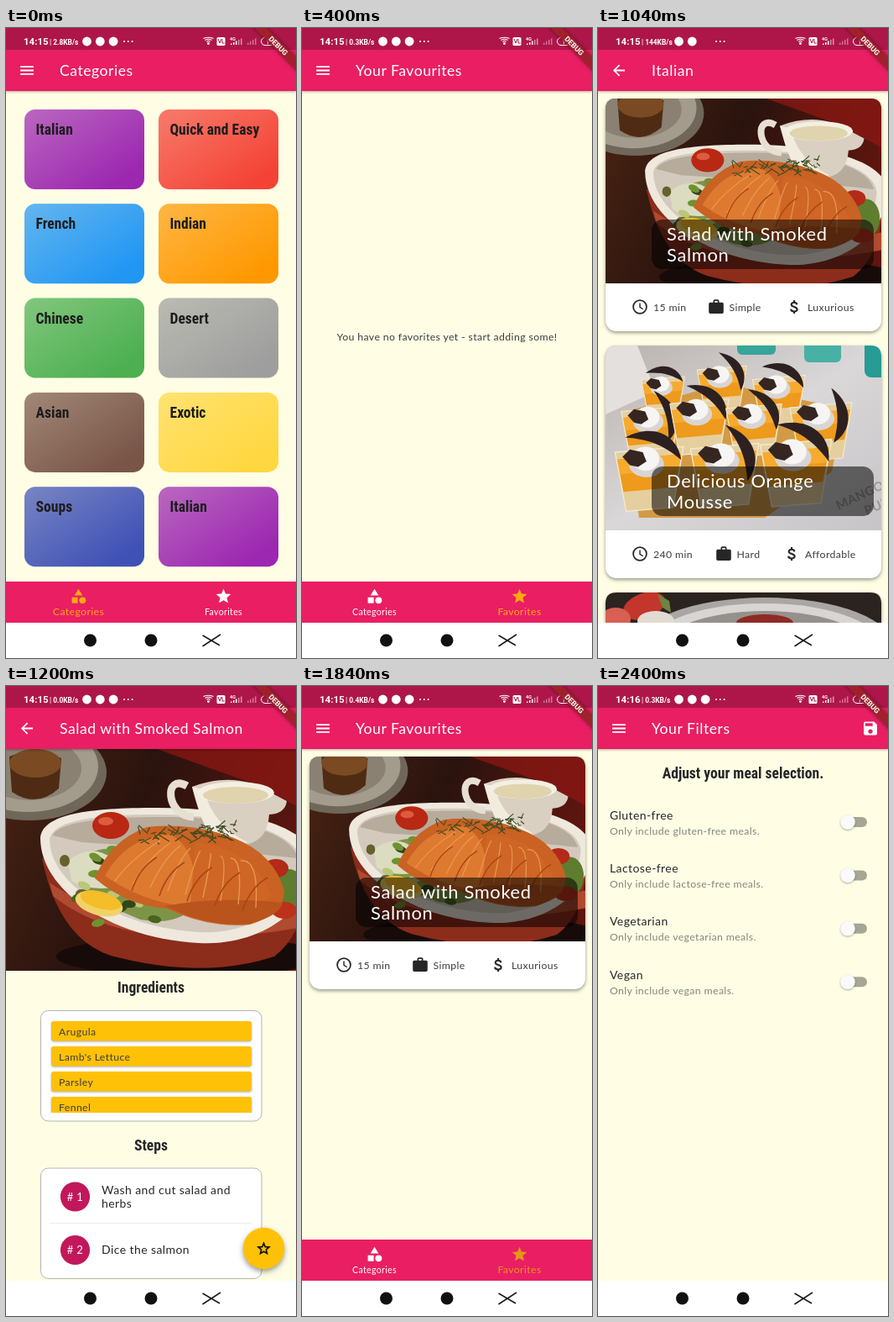
An HTML page for the animation above (2.8 s loop, 346 by 750 pixels).

```html
<!DOCTYPE html>
<html lang="en">
<head>
<meta charset="utf-8">
<title>Recipe app tour</title>
<style>
html, body { margin: 0; width: 100%; height: 100%; overflow: hidden; background: #fff; }
svg { display: block; }
text { font-family: Lato, sans-serif; letter-spacing: .03em; white-space: pre; }
.cond { font-family: "Roboto Condensed", Roboto, sans-serif; font-stretch: 75%; font-weight: 700; letter-spacing: 0; }
.sys { font-family: Roboto, sans-serif; font-weight: 700; letter-spacing: 0; }
.lift { filter: drop-shadow(0 1px 1px #0005); }
</style>
</head>
<body>
<svg id="stage" width="346" height="750" viewBox="0 0 346 750"></svg>
<script>
const PINK = '#e91e63', CREAM = '#fffee5', AMBER = '#ffc107', INK = '#262626', SOFT_INK = '#3c3c3c';
const PAGE_BOTTOM = 708;

const rect = (x, y, w, h, fill, r = 0, more = '') =>
  `<rect x="${x}" y="${y}" width="${w}" height="${h}" rx="${r}" fill="${fill}" ${more}/>`;
const oval = (x, y, rx, ry, fill, more = '') =>
  `<ellipse cx="${x}" cy="${y}" rx="${rx}" ry="${ry}" fill="${fill}" ${more}/>`;
const dot = (x, y, r, fill, more) => oval(x, y, r, r, fill, more);
const shape = (d, fill, more = '') => `<path d="${d}" fill="${fill}" ${more}/>`;
const line = (d, stroke, width, more = '') =>
  `<path d="${d}" fill="none" stroke="${stroke}" stroke-width="${width}" ${more}/>`;
const text = (x, y, str, size, fill, more = '') =>
  `<text x="${x}" y="${y}" font-size="${size}" fill="${fill}" ${more}>${str}</text>`;
const centred = (x, y, str, size, fill, more = '') =>
  text(x, y, str, size, fill, 'text-anchor="middle" ' + more);
const at = (x, y, body, more = '') => `<g transform="translate(${x} ${y}) ${more}">${body}</g>`;
const times = (n, fn) => Array.from({ length: n }, (_, i) => fn(i)).join('');

let seed = 7;
const random = () => (seed = seed * 16807 % 2147483647) / 2147483647;

// Icons live in a 24-unit box and take currentColor.
const C = 'currentColor';
const icons = {
  menu: shape('M3 18h18v-2H3zM3 13h18v-2H3zM3 6v2h18V6z', C),
  back: shape('M20 11H7.83l5.59-5.59L12 4l-8 8 8 8 1.41-1.41L7.83 13H20z', C),
  save: shape('M17 3H5a2 2 0 0 0-2 2v14a2 2 0 0 0 2 2h14a2 2 0 0 0 2-2V7zM12 19a3 3 0 1 1 0-6 3 3 0 0 1 0 6zM15 9H5V5h10z', C, 'fill-rule="evenodd"'),
  category: shape('M12 2l-5.5 9h11zM3 13.5h8v8H3z', C) + dot(17.5, 17.5, 4.5, C),
  star: shape('M12 17.27L18.18 21l-1.64-7.03L22 9.24l-7.19-.61L12 2 9.19 8.63 2 9.24l5.46 4.73L5.82 21z', C),
  starLine: line('M12 16.2l4.5 2.7-1.2-5.1 4-3.5-5.3-.4L12 5 10 9.9l-5.3.4 4 3.5-1.2 5.1z', C, 1.9),
  clock: dot(12, 12, 9, 'none', 'stroke="currentColor" stroke-width="2"') + line('M12 7v5.5l4.3 2.6', C, 1.6),
  work: shape('M20 6h-4V4a2 2 0 0 0-2-2h-4a2 2 0 0 0-2 2v2H4a2 2 0 0 0-2 2v11a2 2 0 0 0 2 2h16a2 2 0 0 0 2-2V8a2 2 0 0 0-2-2zM14 6h-4V4h4z', C, 'fill-rule="evenodd"'),
  money: line('M15.2 9C15 5 7.7 5 7.7 8.8c0 4 7.9 2.3 7.9 6.5 0 4-8.4 3.9-8.5-.3M11.5 3v3M11.5 18v3', C, 2.4),
  fork: shape('M11 9H9V2H7v7H5V2H3v7c0 2.12 1.66 3.84 3.75 3.97V22h2.5v-9.03C11.34 12.84 13 11.12 13 9V2h-2zM16 6v8h2.5v8H21V2c-2.76 0-5 2.24-5 4z', C),
  gear: dot(12, 12, 5.3, 'none', 'stroke="currentColor" stroke-width="4"') +
    dot(12, 12, 8.5, 'none', 'stroke="currentColor" stroke-width="3.2" stroke-dasharray="4.45" stroke-dashoffset="2.2"'),
};
const icon = (name, x, y, color, scale = .88) =>
  `<g color="${color}" transform="translate(${x} ${y}) scale(${scale}) translate(-12 -12)">${icons[name]}</g>`;

// Salmon bowl, drawn for the 346 x 264 detail header starting at y = 75.
const salmon = () => [
  rect(-12, 75, 372, 266, 'url(#table)'),
  shape('M180 75H360V150L300 118z', '#8e1712', 'opacity=".75"'),
  oval(28, 103, 92, 57, '#6f675a'), oval(26, 96, 84, 54, '#a39b8b'), oval(28, 98, 62, 38, '#8a8172'),
  shape('M4 84Q34 72 66 86L63 122Q36 146 7 126z', '#4f2b14'), oval(35, 92, 31, 17, '#7a4a22'),
  oval(220, 322, 160, 24, '#170b09'),
  shape('M43 205Q62 300 125 321Q235 350 320 322Q362 290 360 210z', '#8c2c1b'),
  shape('M56 250Q150 325 360 286L360 262Q170 315 52 234z', '#b04a30'),
  shape('M41 182C42 152 100 145 180 145S360 160 366 205C366 270 300 310 230 306C130 301 42 246 41 182z', '#efe8dd'),
  shape('M52 184C54 160 105 153 180 153S346 168 352 208C350 262 290 296 232 293C140 289 54 240 52 184z', '#d3cabd'),
  shape('M56 178C62 160 130 155 200 156S340 172 348 205L300 200L90 186z', '#b7ab9c'),
  shape('M82 215Q108 182 150 200L230 250Q215 288 160 278L95 250z', '#7d9446'),
  shape('M74 208Q102 186 128 206L140 238Q100 246 78 232z', '#dbdcc0'),
  times(44, i => oval(88 + random() * 120, 190 + random() * 30 + i * 1.4, 8, 4.5,
    ['#47651d', '#6f9230', '#b9c77a', '#33451a'][i % 4], `transform="rotate(${i * 37 % 60 - 30} 150 240)"`)),
  oval(338, 244, 18, 26, '#5f7d2e'),
  oval(322, 217, 15, 11, '#b32a18'), oval(332, 267, 15, 10, '#bd3019'),
  oval(125, 166, 22, 16, '#b92812'), oval(119, 161, 9, 5, '#dd5c40'),
  oval(70, 208, 6, 7, '#65612b'), oval(90, 247, 7, 5, '#65612b'),
  oval(111, 259, 29, 14, '#f1d26a', 'transform="rotate(15 111 259)"'),
  oval(113, 255, 25, 10, '#f5bd27', 'transform="rotate(15 113 255)"'),
  line('M216 119C188 103 190 155 224 156', '#e6dfd2', 9),
  shape('M222 120Q275 100 318 128L335 137Q333 152 314 153Q312 188 278 190Q240 186 232 150z', '#d9d0c1'),
  shape('M222 120Q232 160 242 174Q265 194 288 186Q246 165 236 123z', '#f2ecdf'),
  oval(274, 127, 46, 13, '#f4efe2'), oval(274, 130, 39, 10, '#dfd4ad'),
  shape('M106 229Q124 184 168 168Q222 162 272 181Q320 200 332 244Q332 271 291 284Q243 289 192 265Q145 262 106 229z', '#c96222'),
  shape('M118 226Q145 178 196 177Q230 192 226 262Q170 262 118 226z', '#de7a30'),
  shape('M226 186Q296 194 317 250Q270 280 220 260z', '#cf6626'),
  shape('M190 262Q250 250 330 258Q326 274 291 283Q243 288 190 262z', '#b8541c'),
  times(9, i => line(`M${130 + i * 21} ${232 + i * 4}Q${150 + i * 19} 205 ${184 + i * 12} ${184 + i * 3}`, '#e99a52', 1.3)),
  times(5, i => line(`M${150 + i * 33} ${244 + i * 6}q9 -28 30 -40`, '#a94614', 1.6)),
  times(70, () => {
    const x = 160 + random() * 112, y = 186 - (x - 150) * .1 + random() * 14 - 10;
    return line(`M${x} ${y}l${random() * 26 - 13} ${random() * 18 - 10}`, '#3c4a20', 1.2);
  }),
].join('');

const cup = (x, y, size, turn) => at(x, y, [
  shape('M-36 -10L38 -16L27 50L-24 54z', '#e6cf9f'),
  shape('M-34 -2L36 -8L29 28L-27 33z', '#ee9a1c'), shape('M-34 -2L36 -8L33 8L-32 14z', '#f6ab2f'),
  line('M-36 -10L38 -16L27 50L-24 54z', '#f5ead0', 1.2),
  oval(-2, 3, 19, 14, '#d9d5d3'), oval(-3, -3, 15, 13, '#f7f5f3'),
  shape('M-20 4l-8 -9 8 -8 14 3 4 10 -9 6z', '#352622'),
  shape('M-2 -36C34 -28 42 2 28 22C24 -3 16 -18 -2 -36z', '#2d2020', `transform="rotate(${turn})"`),
].join(''), `scale(${size})`);

// Photos below use card coordinates (329 x 220).
const mousse = () => [
  rect(0, 0, 329, 220, 'url(#cloth)'),
  shape('M0 0H38L60 55L0 82z', '#e4e0dd'),
  rect(157, -6, 46, 17, '#38a59a', 6), rect(237, -6, 44, 26, '#48b0a4', 6), rect(309, -6, 30, 44, '#279b94', 8),
  shape('M20 80L140 45L285 75L270 150L190 205L40 205z', '#d39a45'),
  at(278, 196, text(0, 0, 'MANGO', 15, '#9c9795', 'font-weight="700"') + text(28, 20, 'PUDD', 15, '#9c9795', 'font-weight="700"'), 'rotate(-25)'),
  [[68, 48, .7], [138, 37, .8], [206, 49, .85], [53, 88, .95], [111, 79, .95], [256, 84, 1], [176, 84, .9],
    [51, 138, 1.1], [141, 134, 1.1], [226, 130, 1.15]].map((spot, i) => cup(...spot, i * 47 % 80 - 50)).join(''),
].join('');

const dessert = () => [
  rect(0, 0, 329, 220, '#2b2320'),
  oval(190, 66, 155, 60, '#aaa6a4'), oval(190, 70, 145, 57, '#d8d5d3'), oval(190, 74, 132, 52, '#96908d'),
  oval(46, 16, 26, 15, '#c2362c', 'transform="rotate(-20 46 16)"'), oval(12, 32, 18, 14, '#d76052'),
  oval(60, 34, 22, 12, '#e3dad2'), shape('M62 2l14 8 2 14 -10 -6z', '#6f8440'), oval(190, 36, 34, 10, '#8f2a25'),
].join('');

const SALMON = '<use href="#salmon" transform="translate(10.7 -74.2) scale(.889)"/>';
const defs = () => `<defs>
  <linearGradient id="table" x2="1" y2=".3"><stop stop-color="#4a2413"/><stop offset=".5" stop-color="#2a130e"/><stop offset="1" stop-color="#5e150f"/></linearGradient>
  <linearGradient id="cloth" x2="1" y2="1"><stop stop-color="#b9b2ad"/><stop offset=".5" stop-color="#d9d7d8"/><stop offset="1" stop-color="#c6c4c6"/></linearGradient>
  <linearGradient id="sheen" x2="1" y2="1"><stop stop-color="${CREAM}" stop-opacity=".3"/><stop offset=".85" stop-color="${CREAM}" stop-opacity="0"/></linearGradient>
  <clipPath id="cardTop"><path d="M0 220V13Q0 0 13 0H316Q329 0 329 13V220z"/></clipPath>
  <clipPath id="list"><rect x="45" y="390" width="256" height="118"/></clipPath>
  <clipPath id="page"><rect width="346" height="${PAGE_BOTTOM}"/></clipPath>
  <g id="salmon">${salmon()}</g></defs>`;

const header = (title, left = 'menu') =>
  rect(0, 20, 346, 55, PINK, 0, 'style="filter:drop-shadow(0 1.5px 1.5px #0005)"') + rect(0, 0, 346, 26, '#ae164a') +
  icon(left, 25, 50.5, '#fff') + text(64, 57, title, 17.6, '#fff');

const tabs = (active, accent = '#ffa814') => rect(0, 659, 346, 50, PINK) +
  [['category', 'Categories', 86.5], ['star', 'Favorites', 259.5]].map(([name, label, x], i) => {
    const color = i === active ? accent : '#fff';
    return icon(name, x, 676.5, color) + centred(x, 698.5, label, i === active ? 12.3 : 10.6, color);
  }).join('');

const mealCard = (y, photo, title, facts) => at(9, y,
  rect(0, 0, 329, 277, '#fff', 13, 'style="filter:drop-shadow(0 2px 2px #0006)"') +
  `<g clip-path="url(#cardTop)">${photo}</g>` + rect(55, 144, 265, 59, '#0000008a', 13) +
  title.map((str, i) => text(73, 169 + i * 25, str, 21.9, '#fff')).join('') +
  facts.map(([name, x, str], i) => icon(name, x - 9, 248, INK) + text(x + (i ? 6.5 : 7), 252.5, str, 12.3, SOFT_INK)).join(''));

const salmonCard = () => mealCard(84, SALMON, ['Salad with Smoked', 'Salmon'],
  [['clock', 50, '15 min'], ['work', 141, 'Simple'], ['money', 234.5, 'Luxurious']]);

const categories = () => [
  ['Italian', '#9c27b0'], ['Quick and Easy', '#f44336'], ['French', '#2196f3'], ['Indian', '#ff9800'],
  ['Chinese', '#4caf50'], ['Desert', '#9e9e9e'], ['Asian', '#795548'], ['Exotic', '#ffd740'],
  ['Soups', '#3f51b5'], ['Italian', '#9c27b0'],
].map(([name, color], i) => at(22 + i % 2 * 160, 97 + (i >> 1) * 112.3,
  rect(0, 0, 143, 95, color, 13) + rect(0, 0, 143, 95, 'url(#sheen)', 13) +
  text(13.5, 30, name, 17.6, '#1d1d1d', 'class="cond"'))).join('');

const favourites = accent => header('Your Favourites') + salmonCard() + tabs(1, accent);

const panel = y => rect(41.5, y, 263.5, 131.5, '#fff', 9, 'stroke="#b4b4b4"');
const detail = () => [
  '<use href="#salmon"/>', rect(0, 339, 346, 370, CREAM), header('Salad with Smoked Salmon', 'back'),
  centred(173, 365, 'Ingredients', 17.6, INK, 'class="cond"'), panel(386.5),
  '<g clip-path="url(#list)">',
  ['Arugula', "Lamb's Lettuce", 'Parsley', 'Fennel'].map((str, i) =>
    rect(54, 399 + i * 30, 239, 23.5, AMBER, 3, 'class="lift"') + text(63, 415.5 + i * 30, str, 12.3, SOFT_INK)).join(''),
  '</g>',
  centred(173, 553, 'Steps', 17.6, INK, 'class="cond"'), panel(574),
  [608, 671.5].map((y, i) => dot(82.5, y, 17.6, '#c2185b') + centred(82.5, y + 4.5, '# ' + (i + 1), 13, '#fff')).join(''),
  rect(52, 639, 241, 1, '#ececec'),
  text(114, 604.5, 'Wash and cut salad and', 14, INK), text(114, 621, 'herbs', 14, INK),
  text(114, 676, 'Dice the salmon', 14, INK),
  dot(307.5, 669.5, 24.7, AMBER, 'style="filter:drop-shadow(0 3px 3px #0006)"'), icon('starLine', 307.5, 669.5, '#111'),
].join('');

const drawer = () => favourites() + rect(0, 0, 346, PAGE_BOTTOM, '#0000008a') +
  rect(0, 0, 268, PAGE_BOTTOM, CREAM, 0, 'style="filter:drop-shadow(3px 0 5px #0007)"') +
  rect(0, 0, 268, 132, AMBER) + rect(0, 0, 268, 26, '#bf9106') +
  text(18, 75.5, 'Savoury Go', 26.4, '#111', 'font-weight="900"') +
  [['fork', 'Meals'], ['gear', 'Filters']].map(([name, str], i) =>
    icon(name, 25, 174.5 + i * 63.5, '#858478') + text(64, 182 + i * 63.5, str, 21.1, '#161616', 'class="cond"') +
    rect(0, 206 + i * 63, 268, 1, '#edecd6')).join('');

const filters = () => header('Your Filters') + icon('save', 325, 50.5, '#fff') +
  centred(173, 109.5, 'Adjust your meal selection.', 17.6, INK, 'class="cond"') +
  ['Gluten-free', 'Lactose-free', 'Vegetarian', 'Vegan'].map((str, i) => at(0, i * 63.4,
    text(14, 158.5, str, 14, INK) +
    text(14, 176.5, `Only include ${str.toLowerCase()} meals.`, 12.3, '#85847a') +
    rect(292, 156, 29, 12, '#a7a693', 6) + dot(298, 162, 8.8, '#fafafa', 'class="lift"'))).join('');

const statusBar = (clock, speed, dots) => [
  text(21, 20, clock, 11.5, '#fff', 'class="sys"'), text(52, 19.5, `| ${speed}KB/s`, 8.4, '#fff', 'class="sys"'),
  times(dots, i => dot(96.5 + i * 15.8, 16, 5.4, '#fff')),
  times(3, i => dot(141 + i * 4.8, 16, 1, '#fff')),
  times(3, i => line(`M${239.5 - i * 2} ${16.5 - i * 2}q${2 + i * 2} -2.5 ${4 + i * 4} 0`, '#fff', 1.2)), dot(241.5, 18.5, 1.4, '#fff'),
  rect(251.5, 11, 10, 10, '#fff', 1.5), line('M253 13l2 5l2 -5M258 13v5h2.5', '#ae164a', 1),
  text(267, 15, '4G', 5.5, '#fff', 'class="sys"'),
  times(5, i => rect(268 + i * 3, 18.5 - i * 1.5, 1.5, 1.5 + i * 1.5, i < 3 ? '#fff' : '#fff8')),
  times(4, i => rect(288 + i * 3, 17.5 - i * 1.7, 1.5, 2.5 + i * 1.7, '#fff6')),
  rect(304.5, 11.5, 20, 9, 'none', 4.5, 'stroke="#fff"'), text(310, 19, '19', 7.5, '#fff', 'class="sys"'),
].join('');

const banner = at(346, 0, rect(-40, 24.6, 80, 10.6, '#a0202c', 0, 'style="filter:drop-shadow(0 0 2px #0008)"') +
  centred(0, 33, 'DEBUG', 8.8, '#fff', 'class="sys"'), 'rotate(45)');

const navBar = rect(0, PAGE_BOTTOM, 346, 42, '#fff') +
  dot(100.5, 729, 7.5, '#111') + dot(173, 729, 7.5, '#111') +
  line('M234.5 723L255 735M234.5 736L256 722', '#1a1a1a', 1.5);

const screens = [
  [header('Categories') + categories() + tabs(0), '14:15', '2.8', 3],
  [header('Your Favourites') + centred(173, 371.5, 'You have no favorites yet - start adding some!', 12.3, SOFT_INK) + tabs(1), '14:15', '0.3', 3],
  [header('Italian', 'back') + salmonCard() +
    mealCard(378, mousse(), ['Delicious Orange', 'Mousse'], [['clock', 50, '240 min'], ['work', 150, 'Hard'], ['money', 231.5, 'Affordable']]) +
    mealCard(672, dessert(), [], []), '14:15', '144', 2],
  [detail(), '14:15', '0.0', 3],
  [favourites('#e8951a'), '14:15', '0.4', 3],
  [drawer(), '14:16', '0.5', 3],
  [filters(), '14:16', '0.3', 3],
];

const stage = document.getElementById('stage');
stage.innerHTML = defs() + screens.map(([body, ...status]) =>
  `<g class="screen" clip-path="url(#page)">${rect(0, 0, 346, PAGE_BOTTOM, CREAM)}${body}${statusBar(...status)}</g>`).join('') + banner + navBar;
const layers = stage.querySelectorAll('.screen');

function draw() {
  const current = Math.floor(performance.now() % 2800 / 400);
  layers.forEach((layer, i) => layer.style.display = i === current ? '' : 'none');
  requestAnimationFrame(draw);
}
draw();
</script>
</body>
</html>
```
